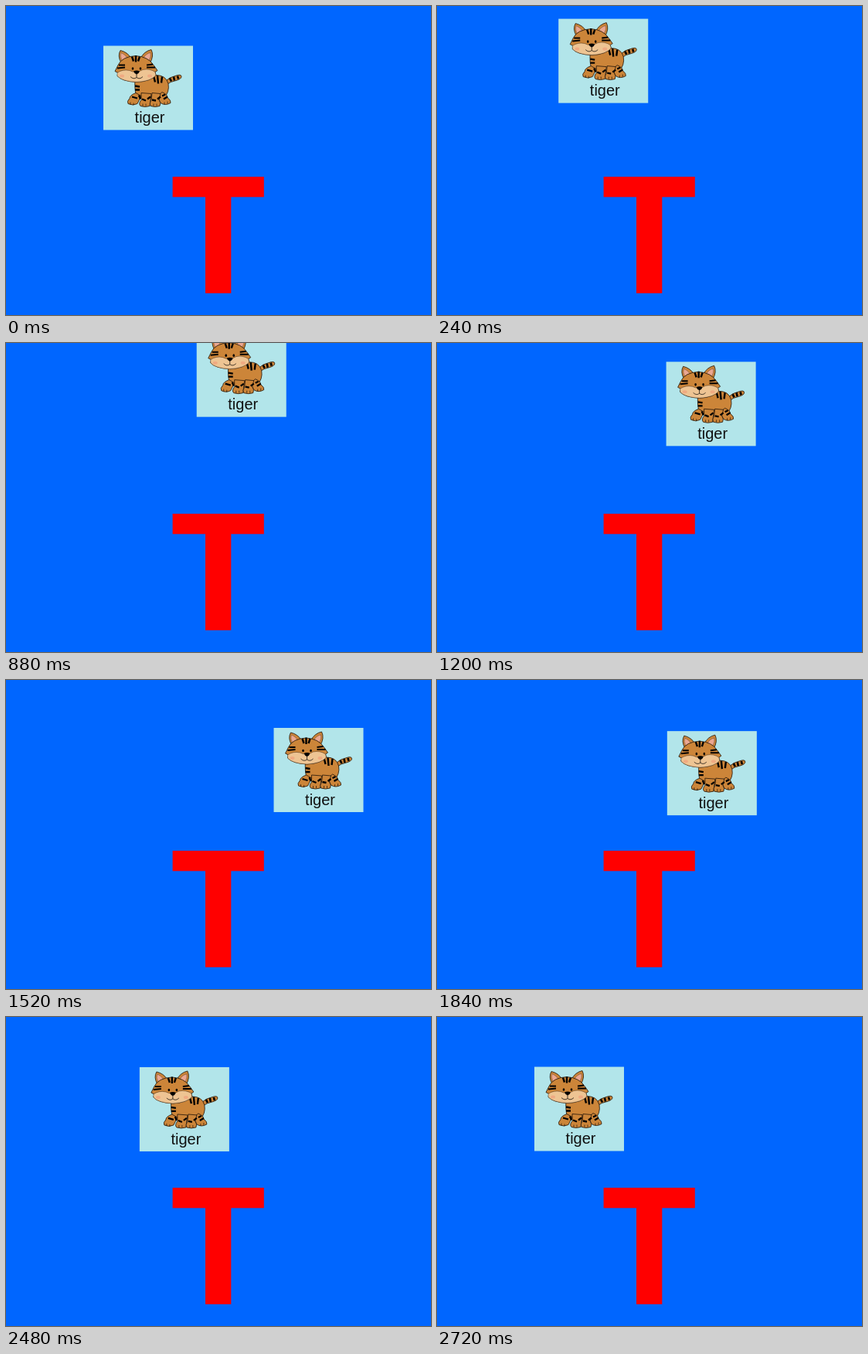
Recreate the animation shown at these times as an HTML page with a canvas. Size 550 by 400 pixels, loop 2800 ms.

```html
<!DOCTYPE html>
<html lang="en">
<head>
<meta charset="utf-8">
<title>T is for tiger</title>
<style>
html, body { margin: 0; width: 100%; height: 100%; overflow: hidden; background: #06f; }
canvas { display: block; }
</style>
</head>
<body>
<canvas id="stage" width="550" height="400" aria-label="T, tiger"></canvas>
<script>
const ctx = document.getElementById('stage').getContext('2d');
const STEP = 80, STEPS = 35;
const CARD = { w: 116, h: 109 };
const COLORS = {
  sky: '#0066ff', letter: '#ff0000', card: '#b2e5ea',
  fur: '#cc8539', cream: '#eec493', pink: '#eba791', ink: '#20140a'
};

// Each leg runs in a straight line between two steps; [x, y] is the card's corner.
const LEGS = [
  { start: 0, end: 8, from: [126, 51.5], to: [209.3, -41.6] },
  { start: 8, end: 19, from: [209.3, -41.6], to: [346.5, 62] },
  { start: 20, end: 34, from: [344.7, 66.6], to: [126, 64.5] }
];

function cardPosition(step) {
  const leg = LEGS.find(l => step <= l.end);
  const k = (step - leg.start) / (leg.end - leg.start);
  return leg.from.map((v, i) => v + (leg.to[i] - v) * k);
}

function shape(d, fill, line = 0.8) {
  const path = new Path2D(d);
  ctx.fillStyle = fill;
  ctx.fill(path);
  if (line) {
    ctx.lineWidth = line;
    ctx.strokeStyle = COLORS.ink;
    ctx.stroke(path);
  }
}

function oval(x, y, rx, ry, fill, line = 0.8) {
  shape(`M${x - rx} ${y}a${rx} ${ry} 0 1 0 ${2 * rx} 0a${rx} ${ry} 0 1 0 ${-2 * rx} 0Z`, fill, line);
}

function stripes(d, width) {
  ctx.lineWidth = width;
  ctx.strokeStyle = '#000';
  ctx.stroke(new Path2D(d));
}

function drawBody() {
  const { fur } = COLORS;
  shape('M79 47Q86 40 93 39Q101 36 101 40Q101 43 94 45Q87 46 81 51Z', fur);
  stripes('M86 42L88 46M91 40L92 45M96 39L97 43', 2.6);
  shape('M41 42Q40 58 43 66Q60 72 78 68Q86 60 84 49Q81 38 68 38Q56 38 41 42Z', fur);
  stripes('M65 39L67 47M70 38.5L71 49M76 40L75 48', 2.4);
  shape('M42 61Q34 64 34 68Q30 72 32 75Q38 78 44 75L49 65Z', fur);
  shape('M76 60Q83 63 83 67Q88 71 87 74Q80 78 74 74L70 65Z', fur);
  shape('M49 61L49 70Q45 75 48 78Q54 80 60 78L62 62Z', fur);
  shape('M63 61L62 70Q59 75 61 78Q67 80 73 78Q75 74 72 70L74 62Z', fur);
  stripes('M41 52L47 53M41 57L47 57M37 66L44 68M46 64L48 69M50 69L55 71M57 69L61 66M63 70L68 71M70 69L74 66M78 69L83 66M76 65L80 63', 2.3);
  stripes('M35 73L35 76M39 74L39 77M51 75L51 78M55 75L55 78M65 75L65 78M69 75L69 78M79 73L79 76M83 72L83 75', 0.6);
}

function drawHead() {
  const { fur, cream, pink } = COLORS;
  shape('M23 22Q18 13 22 6Q31 8 36 16Z', fur);
  shape('M24 19Q21 13 23 9Q28 11 31 16Z', pink, 0.3);
  shape('M48 16Q53 7 62 5Q66 13 60 23Z', fur);
  shape('M52 16Q55 10 61 9Q62 14 59 19Z', pink, 0.3);
  shape('M19 25Q24 14 42 13Q58 14 65 25L70 32L67 34L68 38Q61 46 43 47Q24 46 18 39L19 35L15 33Z', fur);
  shape('M18 35Q25 30 34 32Q39 35 42 33Q47 34 51 31Q60 29 67 34L68 38Q62 46 43 47Q24 46 18 39Z', cream, 0.4);
  oval(24, 39, 3, 2, '#f0aa82', 0);
  oval(60, 39, 3, 2, '#f0aa82', 0);
  stripes('M37 14L39 20M42 12.5L42 21M47 14L45 20', 2.4);
  stripes('M20 25L28 25M18 29L28 28M64 24L56 25M67 28L56 28', 2);
  oval(38, 29.5, 1.3, 1.8, '#000', 0);
  oval(48, 29.5, 1.3, 1.8, '#000', 0);
  shape('M39 33Q43 31 47 33Q46 36 43 37Q40 36 39 33Z', '#000', 0);
  stripes('M43 36L43 41M35 40Q39 44 43 41Q47 44 51 40', 0.7);
}

function drawCard(x, y) {
  ctx.save();
  ctx.translate(x, y);
  ctx.fillStyle = COLORS.card;
  ctx.fillRect(0, 0, CARD.w, CARD.h);
  drawBody();
  drawHead();
  ctx.fillStyle = '#101010';
  ctx.font = '20px "Liberation Sans", Arial, sans-serif';
  ctx.fillText('tiger', 40.6, 99.7);
  ctx.restore();
}

function drawLetter() {
  ctx.fillStyle = COLORS.letter;
  ctx.fillRect(215.6, 221, 118.2, 26.3);
  ctx.fillRect(258, 247, 33.3, 124.8);
}

function draw(time) {
  const step = Math.floor(time / STEP) % STEPS;
  ctx.fillStyle = COLORS.sky;
  ctx.fillRect(0, 0, 550, 400);
  drawLetter();
  drawCard(...cardPosition(step));
}

ctx.lineJoin = 'round';
const startTime = performance.now();
function tick(now) {
  draw(Math.max(0, now - startTime));
  requestAnimationFrame(tick);
}
draw(0);
requestAnimationFrame(tick);
</script>
</body>
</html>
```
